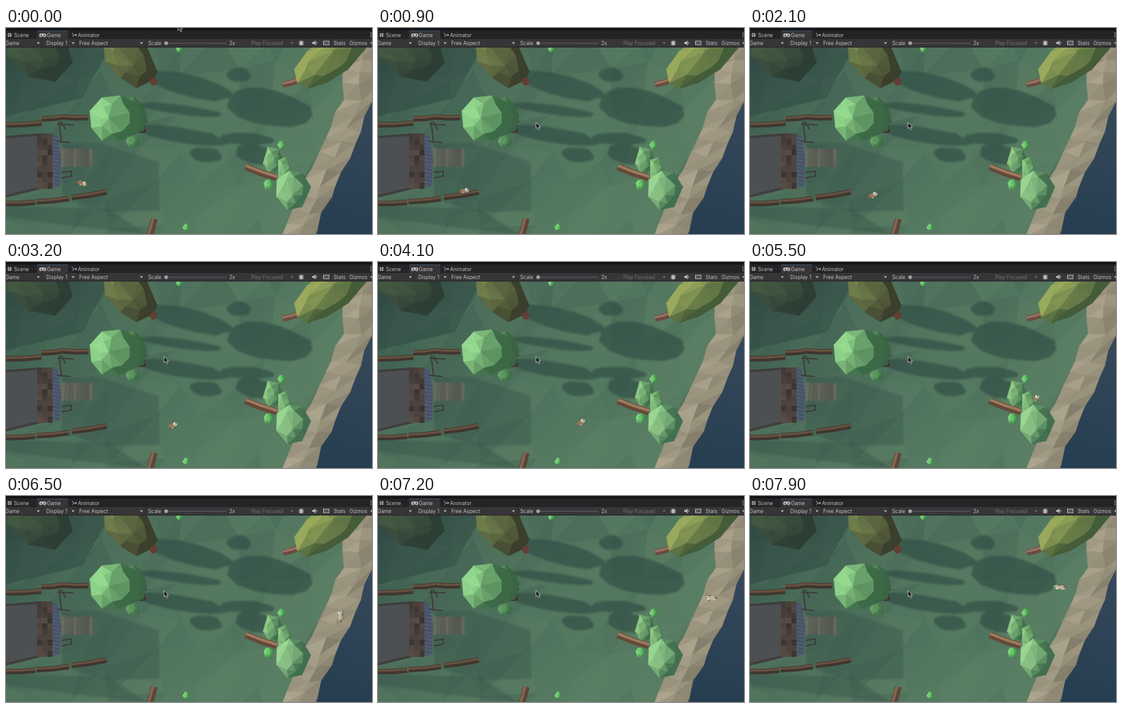
An HTML page with a canvas that plays this animation: 600x338 px, repeating every 8 s.

```html
<!DOCTYPE html>
<html lang="en">
<head>
<meta charset="utf-8">
<title>Game view</title>
<style>
  html, body { margin: 0; width: 100%; height: 100%; overflow: hidden; background: #252326; }
  canvas, svg { position: absolute; left: 0; top: 0; width: 600px; height: 338px; }
  text { font: 8.3px Inter, Roboto, sans-serif; fill: #c0bfc0; }
  .dim { fill: #747274; }
  .line { fill: none; stroke: #bdbcbd; }
  .icon { fill: #bdbcbd; }
</style>
</head>
<body>
<canvas id="view" width="600" height="338"></canvas>
<svg viewBox="0 0 600 338">
  <defs><path id="caret" d="M0 23.500h5l-2.500 3z"/></defs>
  <path fill="#252326" d="M0 0h600v18H0z"/>
  <path fill="#141315" d="M0 0h600v4H0z"/>
  <path fill="#373538" d="M51 4h43v14H51zM94 4h8v14h-8zM0 18h600v13.500H0z"/>
  <path fill="#3b5570" d="M51 4h51v1H51z"/>
  <path fill="#242225" d="M0 31h600v1H0zM58.500 18h.7v13h-.7zM116.500 18h.7v13h-.7zM228.500 18h.7v13h-.7z"/>
  <text x="13" y="14.500">Scene</text>
  <text x="67" y="14.500">Game</text>
  <text x="118" y="14.500">Animator</text>
  <text x="-1" y="27.500">Game</text>
  <text x="66" y="27.500">Display 1</text>
  <text x="120" y="27.500">Free Aspect</text>
  <text x="233" y="27.500">Scale</text>
  <text x="366" y="27.500">2x</text>
  <text x="402" y="27.500" class="dim">Play Focused</text>
  <text x="537" y="27.500">Stats</text>
  <text x="563" y="27.500">Gizmos</text>
  <g class="icon">
    <use href="#caret" x="50.500"/><use href="#caret" x="107.500"/><use href="#caret" x="219.500"/><use href="#caret" x="597"/>
  </g>
  <use href="#caret" x="466.500" class="dim"/>
  <path class="line" d="M4.500 8v7M7.500 8v7M2 10h8M2 13h8"/>
  <path class="icon" fill-rule="evenodd" d="M57 9h6q3 0 3 3t-3 3l-3-1.500-3 1.500q-2.500 0-2.500-3t2.500-3zm0 1.500v3h1.500v-3zm5 0v3h1.500v-3z"/>
  <path class="line" d="M108 8l3 3.500-2 3M111 11.500h5M114 9.500l2 2-2 2"/>
  <path class="line" stroke-width="1.500" stroke-dasharray="1.500" d="M598.300 7.500v8"/>
  <path stroke="#69676a" d="M262 25h99"/>
  <circle cx="262.500" cy="25" r="3" fill="#a4a2a5"/>
  <path class="line" d="M480 22l8 6M480 28l8-6M479.500 25h9M482 20.500l1.500 2M486 20.500l-1.500 2"/>
  <ellipse cx="484" cy="25" rx="2.500" ry="3.700" class="icon"/>
  <path class="icon" d="M502 23h2.500l3-2.500v8l-3-2.500H502z"/>
  <path class="line" d="M509 22.500q1.500 2 0 4"/>
  <rect x="520.500" y="21.500" width="9" height="6" class="line"/>
  <path class="line" stroke-dasharray="1" d="M521 23.500h8M521 25.500h8"/>
  <path id="cursor" d="M0 0v10l2.500-2 1.700 4 2-1-1.700-3.700h3z" fill="#151515" stroke="#ddd" stroke-width=".8"/>
</svg>
<script>
const W = 600, H = 338, LOOP = 8000, STEP = 100, TAU = Math.PI * 2;
const view = document.getElementById('view').getContext('2d');
const cursor = document.getElementById('cursor');
let g, seed = 11;

const rand = () => (seed = seed * 16807 % 2147483647) / 2147483647;
const jitter = size => (rand() - .5) * size;
const lerp = (a, b, k) => a + (b - a) * k;
const clamp = k => Math.max(0, Math.min(1, k));
const times = (n, f) => Array.from({ length: n }, (_, i) => f(i));
const rgb = hex => [1, 3, 5].map(i => parseInt(hex.slice(i, i + 2), 16));
const mix = (a, b, k) => `rgb(${rgb(a).map((v, i) => Math.round(lerp(v, rgb(b)[i], clamp(k))))})`;

function layer(paint) {
  const c = document.createElement('canvas');
  c.width = W; c.height = H;
  g = c.getContext('2d');
  paint();
  return c;
}

function poly(points, fill, seam) {
  g.beginPath();
  for (const [x, y] of points) g.lineTo(x, y);
  g.closePath();
  g.fillStyle = fill;
  g.fill();
  if (seam) { g.strokeStyle = fill; g.lineWidth = .6; g.stroke(); }
}

function blob(x, y, rx, ry, color, turn = 0) {
  g.beginPath();
  g.ellipse(x, y, rx, ry, turn, 0, TAU);
  g.fillStyle = color;
  g.fill();
}

// Point on a turned ellipse; r runs from the centre (0) to the rim (1).
function onEllipse(x, y, rx, ry, turn, a, r) {
  const u = r * rx * Math.cos(a), v = r * ry * Math.sin(a);
  return [x + u * Math.cos(turn) - v * Math.sin(turn), y + u * Math.sin(turn) + v * Math.cos(turn)];
}

// Low-poly dome lit from the upper left.
function gem(x, y, rx, ry, dark, light, turn = 0, n = 8) {
  const sun = [-.78, -.32, .54];
  const at = (a, r) => [...onEllipse(x, y, rx, ry, turn, a, r), Math.sqrt(Math.max(0, 1 - r * r)) * Math.min(rx, ry)];
  const ring = (r, shift) => times(n, i => at((i + shift + jitter(.5)) * TAU / n, r * (1 + jitter(.14))));
  const rim = ring(1, 0), mid = ring(.62, .5), top = at(rand() * TAU, .25);
  const face = (a, b, c) => {
    const [p, q] = [b, c].map(v => v.map((k, i) => k - a[i]));
    let normal = [p[1] * q[2] - p[2] * q[1], p[2] * q[0] - p[0] * q[2], p[0] * q[1] - p[1] * q[0]];
    const size = Math.hypot(...normal) * Math.sign(normal[2]) || 1;
    const lit = normal.reduce((s, v, i) => s + v / size * sun[i], 0);
    poly([a, b, c], mix(dark, light, lit * 1.05 + jitter(.16)), true);
  };
  for (let i = 0; i < n; i++) {
    const j = (i + 1) % n;
    face(rim[i], rim[j], mid[i]);
    face(mid[i], rim[j], mid[j]);
    face(mid[i], mid[j], top);
  }
}

const bush = (x, y, r) => gem(x, y, r, r, '#3f8a4a', '#84e080', 0, 6);

function log(x1, y1, x2, y2, w, dark = '#40362f', light = '#67523f') {
  const len = Math.hypot(x2 - x1, y2 - y1), nx = (y2 - y1) / len, ny = (x1 - x2) / len;
  const bar = (shift, width, color) => {
    g.beginPath();
    for (const k of [0, .5, 1]) g.lineTo(lerp(x1, x2, k) + nx * shift, lerp(y1, y2, k) + ny * shift + (k === .5));
    g.strokeStyle = color;
    g.lineWidth = width;
    g.stroke();
  };
  bar(0, w, dark);
  bar(w * .2, w * .4, light);
}

function ground() {
  const base = g.createLinearGradient(0, 32, 330, 338);
  base.addColorStop(0, '#36534a');
  base.addColorStop(.35, '#4b6d5a');
  base.addColorStop(1, '#577c62');
  g.fillStyle = base;
  g.fillRect(0, 0, W, H);
  const cell = 62;
  const grid = times(7, r => times(12, c => [(c - .5 + rand() * .7) * cell, 10 + (r - .3 + rand() * .7) * cell]));
  const tint = () => rand() < .5 ? `rgba(35,58,55,${rand() * .11})` : `rgba(120,150,112,${rand() * .1})`;
  for (let r = 0; r < 6; r++) for (let c = 0; c < 11; c++) {
    const [a, b, d, e] = [grid[r][c], grid[r][c + 1], grid[r + 1][c], grid[r + 1][c + 1]];
    poly([a, b, d], tint());
    poly([b, e, d], tint());
  }
  poly([[0, 32], [170, 32], [125, 115], [0, 145]], 'rgba(40,64,60,.4)');
}

function shadows() {
  g.filter = 'blur(1.5px)';
  const shade = (x, y, rx, ry, turn) => {
    const rim = times(14, i => onEllipse(x, y, rx, ry, turn, i * TAU / 14, 1 + jitter(.2)));
    g.moveTo(...rim[0]);
    for (const p of rim) g.lineTo(...p);
    g.closePath();
  };
  g.beginPath();
  shade(381, 77, 20, 12, 0);
  shade(298, 94, 76, 17, .25);
  shade(430, 129, 68, 31, .2);
  shade(285, 134, 68, 8, .12);
  shade(288, 176, 75, 13, .16);
  shade(395, 182, 46, 10, .05);
  shade(328, 208, 26, 12, .1);
  shade(412, 208, 36, 16, .2);
  shade(488, 272, 18, 30, .3);
  g.fillStyle = 'rgba(50,78,70,.68)';
  g.fill();
  poly([[92, 190], [150, 188], [250, 220], [252, 300], [165, 302], [92, 280]], 'rgba(50,78,70,.34)');
  poly([[0, 292], [168, 297], [230, 338], [110, 325], [0, 310]], 'rgba(50,78,70,.36)');
  g.filter = 'none';
}

function coast() {
  const sea = g.createLinearGradient(600, 130, 545, 338);
  sea.addColorStop(0, '#36485a');
  sea.addColorStop(1, '#263e51');
  poly([[600, 110], [600, 338], [480, 338], [540, 230]], sea);

  const rows = 15;
  const spine = y => y < 110 ? 580 : 580 - (y - 110) * .445;
  const chain = side => times(rows, i => {
    const y = 26 + i * 23;
    return [spine(y) + side * 25 + jitter(9), y + jitter(9) + side * 3];
  });
  const [left, ridge, right] = [-1, .1, 1].map(chain);
  const strip = (a, b, shade) => {
    for (let i = 0; i < rows - 1; i++) {
      const tone = () => mix('#6f6959', '#b3ab93', shade + jitter(.4));
      poly([a[i], a[i + 1], b[i]], tone(), true);
      poly([a[i + 1], b[i + 1], b[i]], tone(), true);
    }
  };
  strip(left, ridge, .75);
  strip(ridge, right, .52);
}

function house() {
  for (let x = 91; x < 143; x += 6.5) {
    const y = 197 + rand() * 2;
    poly([[x, y], [x + 5.7, y], [x + 5.2, y + 29], [x, y + 30]], mix('#55554d', '#6e6b62', rand()));
  }
  poly([[0, 177], [54, 174], [58, 262], [0, 278]], '#4d5052');
  g.strokeStyle = '#3f3e3d';
  g.lineWidth = 4;
  g.stroke(new Path2D('M0 179L54 175M0 276L58 262'));
  for (let y = 173; y < 258; y += 9) for (let x = 51; x < 72; x += 8.5) {
    poly([[x, y], [x + 9, y], [x + 8, y + 10], [x, y + 10]], mix('#3a322f', '#5b4e47', rand()));
  }
  poly([[75, 174], [85, 178], [90, 215], [88, 260], [78, 262]], '#48536a');
  for (let y = 180; y < 260; y += 6) poly([[77, y], [88, y + 2], [88, y + 3], [77, y + 1]], '#5f6a80');
  g.strokeStyle = '#3d3a39';
  g.lineWidth = 2;
  g.stroke(new Path2D('M87 153L91 188M84 158L111 159M84 186L106 188M90 153L98 167M91 237L107 235V243L91 246'));
}

function fence() {
  log(0, 159, 58, 156, 9);
  log(58, 149, 94, 146, 9);
  log(94, 146, 135, 147, 9);
  log(0, 288, 48, 286, 9);
  log(50, 285, 103, 280, 9);
  log(108, 278, 165, 269, 9);
}

const back = layer(() => {
  ground();
  shadows();
  coast();
  house();
  fence();
  bush(284, 35, 5);
  bush(296, 327, 6);
  bush(452, 192, 7);
  log(236, 339, 243, 313, 11, '#5c4538', '#85674f');
});

const front = layer(() => {
  log(214, 166, 229, 166, 11, '#41342f', '#54423a');
  log(222, 152, 231, 153, 4);
  gem(56, 42, 58, 43, '#2d3e35', '#465b43', .4);
  gem(203, 49, 56, 36, '#3b3f2c', '#75854f', .85, 9);
  blob(242, 88, 6, 6.500, '#643d33');
  log(454, 93, 484, 84, 10, '#6b4b40', '#987161');
  gem(531, 50, 68, 34, '#445c38', '#9aaa5c', -.6, 10);
  gem(208, 186, 12, 10, '#3f7048', '#6aa768');
  gem(206, 145, 24, 34, '#3a6443', '#62965f');
  gem(179, 148, 41, 40, '#3c6a46', '#97dc90', 0, 9);
  gem(437, 217, 17, 23, '#41704e', '#92cd87', 0, 6);
  log(393, 228, 444, 246, 11, '#654939', '#a07a5d');
  gem(456, 233, 14, 22, '#477c50', '#92cd87', 0, 5);
  gem(470, 266, 29, 34, '#426f50', '#9ad591', 0, 7);
  bush(431, 257, 9);
});

// Stops along the animal's walk: time, x, y.
const walk = [
  [0, 125, 255], [900, 142, 267], [2100, 202, 274], [4100, 333, 263],
  [5500, 468, 224], [6500, 548, 196], [7000, 556, 172], [LOOP, 502, 147]
];

function animal(t) {
  const i = walk.findLastIndex(stop => stop[0] <= t);
  const [[t0, x0, y0], [t1, x1, y1]] = [walk[i], walk[i + 1]];
  const k = (t - t0) / (t1 - t0), turn = Math.atan2(y1 - y0, x1 - x0) - .3;
  const pale = clamp((t - 5500) / 900), gait = Math.sin(t / 80) * .8;
  g = view;
  g.save();
  g.translate(lerp(x0, x1, k), lerp(y0, y1, k));
  g.rotate(turn);
  g.scale(1 + pale * .3, 1);
  blob(0, 2, 8, 3, 'rgba(40,60,55,.35)');
  blob(-3, 0, 5, 3.500, mix('#94795f', '#c0b59d', pale));
  blob(-7, 1, 2.200, 1.700, '#86664f');
  blob(-2, 3 + gait, 1.800, 1.300, '#b99c7e');
  blob(2, -3 - gait, 1.800, 1.300, '#75624e');
  blob(4, 0, 3.300, 2.800, '#bcbba4');
  blob(2.500, -2.500, 2.200, 1.200, '#e2dfd0', -.5);
  blob(2.500, 2.500, 2.200, 1.200, '#a98d70', .5);
  blob(5.500, -.8, 1, .8, '#57605a');
  g.restore();
}

function frame(now) {
  const t = Math.floor(now % LOOP / STEP) * STEP;
  view.drawImage(back, 0, 0);
  animal(t);
  view.drawImage(front, 0, 0);
  const k = clamp((t - 100) / 600), ease = k * k * (3 - 2 * k);
  cursor.setAttribute('transform', `translate(${lerp(282, 259, ease)} ${lerp(-6, 155, ease)})`);
  requestAnimationFrame(frame);
}
requestAnimationFrame(frame);
</script>
</body>
</html>
```
